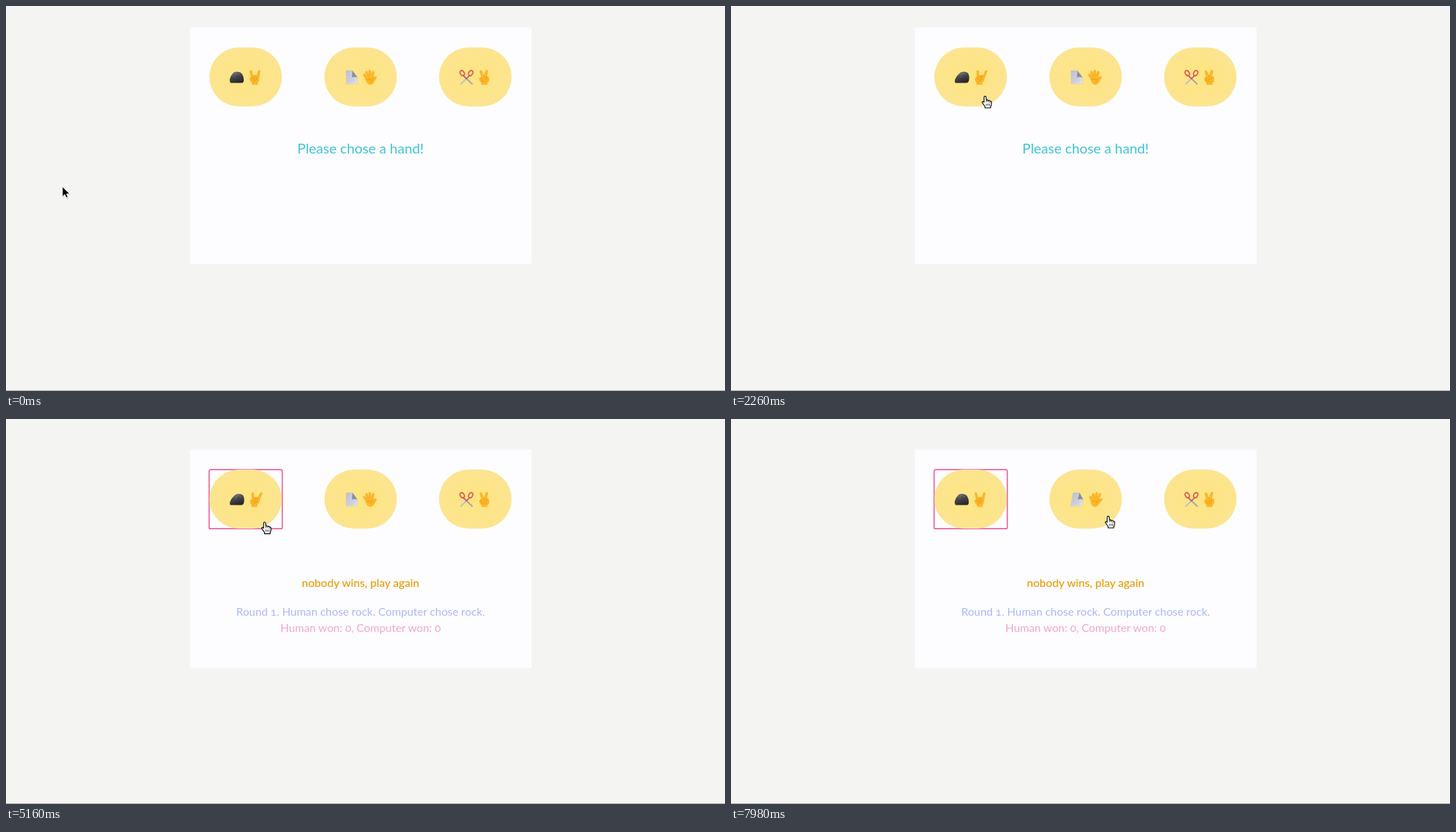
An HTML page for the animation above (8 s loop, 1022 px wide and 548 px high).

```html
<!DOCTYPE html>
<html lang="en">
<head>
<meta charset="utf-8">
<title>Rock, paper, scissors</title>
<style>
  html, body { margin: 0; width: 100%; height: 100%; overflow: hidden; background: #f4f4f3; }
  svg { display: block; }
  text { font-family: Lato, "Open Sans", sans-serif; font-size: 15.8px; text-anchor: middle; font-variant-numeric: oldstyle-nums; }
  .hint { font-size: 19.8px; fill: #3fc3d5; }
  .result { font-size: 16.1px; fill: #e99c08; stroke: #e99c08; stroke-width: .15; }
  .round { fill: #aab9f6; }
  .score { fill: #f2a5d0; }
  .skin { fill: #fdb827; stroke: #ee9c1c; stroke-width: .4; stroke-linejoin: round; }
  .crease { fill: none; stroke: #e08a14; stroke-width: .6; stroke-linecap: round; }
</style>
</head>
<body>
<svg width="1022" height="548" viewBox="0 0 1022 548">
  <defs>
    <radialGradient id="gold" cx=".5" cy=".5" r=".62">
      <stop offset="0" stop-color="#fee580"/>
      <stop offset="1" stop-color="#fce494"/>
    </radialGradient>
    <linearGradient id="stone" x2=".4" y2="1">
      <stop offset="0" stop-color="#77777a"/>
      <stop offset=".5" stop-color="#48484b"/>
      <stop offset="1" stop-color="#29292c"/>
    </linearGradient>
    <linearGradient id="sheet" x2="1" y2="1">
      <stop offset="0" stop-color="#b9bfce"/>
      <stop offset="1" stop-color="#e6e8ee"/>
    </linearGradient>

    <!-- icons are centred on 0,0 -->
    <g id="rock">
      <path d="M-10 3Q-9-2-6-5Q-4-8 0-8Q5-8 7.500-5Q10-1 10 4Q10 8 7 8H-8Q-10 8-10 3Z" fill="url(#stone)"/>
      <path d="M-6-3L-1-6L4-4M-1-6L-3 0" fill="none" stroke="#99999b" stroke-width=".7" opacity=".5"/>
    </g>
    <g id="horns">
      <path class="skin" d="M-5 0L-6.800-8Q-7-10-5.700-10Q-4.400-10-4-8.300L-2.400-2Q0-4 2.800-2L5-8.500Q5.600-10.300 6.900-9.900Q8.100-9.500 7.700-7.800L6 1Q6.500 5 4 8V10.300H-3.500V8Q-7 5-7 2Q-7 0-5 0Z"/>
      <path class="crease" d="M-2.400-2V2M.4-3V1.500M2.800-2V2M-5 1Q-2 5 3 3M-3 7Q0 5 2 4"/>
    </g>
    <g id="paper">
      <path d="M-8-9.500H1L8 0V9.500H-8Z" fill="url(#sheet)" stroke="#b5b9c4" stroke-width=".4"/>
      <path d="M1-9.500L0 0Q4-1 8 0Z" fill="#8b909c"/>
      <path d="M-6-3H-1M-6 1.500H6M-6 4H6M-6 6.500H5" stroke="#b6bac8" stroke-width=".6"/>
    </g>
    <g id="palm">
      <path class="skin" d="M-6 2L-9-2.500Q-9.700-4.200-8.500-4.800Q-7.300-5.200-6.400-3.800L-4.200-1L-6-6.500Q-6.300-8.300-5-8.700Q-3.700-9-3-7.300L-1.300-2L-1.500-8.500Q-1.400-10.300 0-10.300Q1.400-10.300 1.600-8.500L2-2L3.500-7.500Q4-9.200 5.400-8.800Q6.700-8.300 6.300-6.600L5 1Q7-1.500 8.800-1.300Q10.200-.8 9.400 .8L5.500 7.500Q4 10.300 1 10.300Q-4 10.300-6 2Z"/>
      <path class="crease" d="M5 1Q1.500 3 1.500 7M-4.500 3Q-1 1.500 2 3"/>
    </g>
    <g id="scissors" fill="none" stroke-linecap="round">
      <path d="M-5-3L8 9.500" stroke="#a0a7b0" stroke-width="2"/>
      <path d="M5-3L-8 9.500" stroke="#bcc2ca" stroke-width="2"/>
      <path d="M-4-2L0 2L4-2" stroke="#df5952" stroke-width="1.700"/>
      <ellipse cx="-6" cy="-6" rx="2.700" ry="3.900" transform="rotate(-32 -6 -6)" stroke="#df5952" stroke-width="1.700"/>
      <ellipse cx="6" cy="-6" rx="2.700" ry="3.900" transform="rotate(32 6 -6)" stroke="#df5952" stroke-width="1.700"/>
      <circle cy="2" r=".9" fill="#777d86"/>
    </g>
    <g id="victory">
      <path class="skin" d="M-4 0L-6.300-7.500Q-6.700-9.300-5.400-9.700Q-4-10-3.400-8.300L-.8-2L2-9Q2.700-10.700 4-10.300Q5.300-9.800 4.900-8L3.200-1Q6-2 6.500 1Q7.300 6 4 8V10.300H-4V8Q-7.500 5-7 2Q-6.500-.5-4 0Z"/>
      <path class="crease" d="M-.8-2L0 1M3.200-1Q4 1 3 3M-4 0Q-6 4-2 4L2 2M-4 5Q0 8 3 5"/>
    </g>

    <!-- pointers have their hot spot at 0,0 -->
    <g id="arrow">
      <path d="M1 2V16L4.300 13L6.500 18L9 17L7 12H12Z" fill="#777" opacity=".22"/>
      <path d="M0 0V14.500L3.400 11.400L5.600 16L8 15L6 10.500H10.500Z" fill="#000" stroke="#fff" stroke-width=".9"/>
    </g>
    <g id="hand">
      <path d="M-1.300 8V1Q-1.200-.6 0-.6Q1.400-.6 1.600 1L2 5Q3.600 4 4.400 5.500Q6 4.800 6.900 6.300Q9 6 9.200 8V11Q9 13 8 14V16H0V14L-3.500 9Q-4.500 7.500-3.300 7Q-2.400 6.800-1.300 8Z" fill="#fff" stroke="#000" stroke-width="1.150" stroke-linejoin="round"/>
      <path d="M2 5V8M4.400 6V8M6.900 7V9M2 10V13M4.300 10V13M6.500 10V13" stroke="#000" stroke-width=".75"/>
    </g>
  </defs>

  <rect width="1022" height="548" fill="#f4f4f3"/>
  <rect y="547" width="1022" height="1" fill="#a9a99f"/>
  <rect id="card" x="261.500" width="485.500" fill="#fdfdff"/>
  <g id="buttons"></g>
  <text id="hint" class="hint" x="504" y="210">Please chose a hand!</text>
  <g id="outcome">
    <text class="result" x="504" y="238.500">nobody wins, play again</text>
    <text class="round" x="504" y="279.700">Round 1. Human chose rock. Computer chose rock.</text>
    <text class="score" x="504" y="302.500">Human won: 0, Computer won: 0</text>
  </g>
  <use id="pointer"/>
</svg>
<script>
const LOOP = 8000, CLICK = 2860;
const $ = id => document.getElementById(id);

const choices = [
  { x: 289, icons: ['rock', 'horns'] },
  { x: 452.5, icons: ['paper', 'palm'] },
  { x: 615.5, icons: ['scissors', 'victory'] }
];

// pointer stops: time, x, y
const path = [
  [0, 80, 257], [140, 92, 252], [420, 230, 197], [680, 337, 157],
  [820, 341, 146], [1000, 346, 139], [1560, 357, 133], [1800, 361, 129],
  [3700, 361, 129], [4080, 364, 136], [4920, 367, 146], [6000, 369, 152],
  [6200, 378, 155], [6500, 470, 146], [6700, 537, 140], [6840, 549, 139],
  [7200, 538, 139], [LOOP, 536, 139]
];
// time, pointer shape, hovered button
const states = [
  [0, 'arrow', -1], [740, 'hand', 0], [6230, 'arrow', -1],
  [6480, 'hand', 1], [6780, 'arrow', 1], [6920, 'hand', 1]
];

$('buttons').innerHTML = choices.map(({ x, icons }, i) => `
  <g transform="translate(${x} 0)">
    ${i ? '' : '<rect id="focus" x="-.3" y=".2" width="104" height="84" rx="2" fill="#fff" stroke="#ed609f" stroke-width="1.7"/>'}
    <rect width="103.2" height="84" rx="42" fill="url(#gold)"/>
    <g class="icons">
      <use href="#${icons[0]}" x="39" y="42.500"/>
      <use href="#${icons[1]}" x="64.500" y="42.500"/>
    </g>
  </g>`).join('');
const labels = document.querySelectorAll('.icons');

const show = (id, on) => $(id).setAttribute('visibility', on ? 'visible' : 'hidden');

function pointerAt(t) {
  const i = Math.max(1, path.findIndex(p => p[0] > t));
  const [t0, x0, y0] = path[i - 1], [t1, x1, y1] = path[i];
  const k = (t - t0) / (t1 - t0);
  return [x0 + (x1 - x0) * k, y0 + (y1 - y0) * k];
}

function draw(t) {
  const played = t >= CLICK;
  $('card').setAttribute('y', played ? 43.5 : 30.5);
  $('card').setAttribute('height', played ? 311 : 337);
  $('buttons').setAttribute('transform', `translate(0 ${played ? 72 : 59})`);
  show('focus', played);
  show('outcome', played);
  show('hint', !played);

  const [, shape, hover] = states.filter(s => s[0] <= t).pop();
  labels.forEach((el, i) => el.setAttribute('transform',
    i === hover ? 'translate(0 48) skewX(-11) translate(0 -48)' : ''));
  $('pointer').setAttribute('href', '#' + shape);
  $('pointer').setAttribute('transform', `translate(${pointerAt(t)})`);
}

function tick() {
  draw(performance.now() % LOOP);
  requestAnimationFrame(tick);
}
tick();
</script>
</body>
</html>
```
